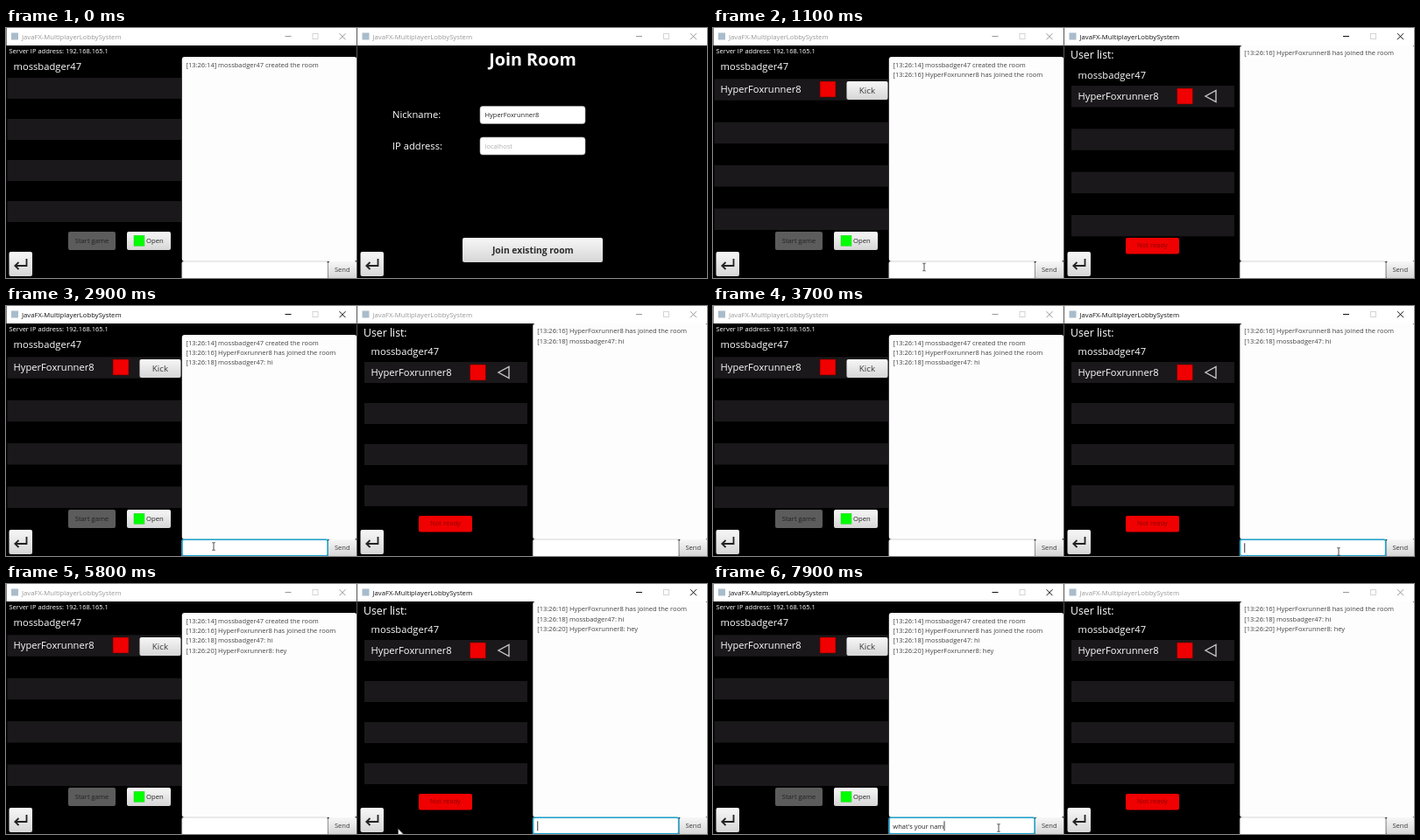
An HTML page for the animation above (8 s loop, 800 px wide and 286 px high).

```html
<!DOCTYPE html>
<html lang="en">
<head>
<meta charset="utf-8">
<title>Lobby</title>
<style>
  html, body { margin: 0; width: 100%; height: 100%; overflow: hidden; background: #000; }
  svg { display: block; width: 800px; height: 286px; }
  text { font-family: "Open Sans", "Noto Sans", sans-serif; white-space: pre; }
</style>
</head>
<body>
<svg id="stage" viewBox="0 0 800 286">
  <defs>
    <linearGradient id="btn" x2="0" y2="1">
      <stop offset="0" stop-color="#f7f7f7"/><stop offset="1" stop-color="#d6d6d6"/>
    </linearGradient>
  </defs>
</svg>
<script>
const LOOP = 8000, STEP = 100;
const HOST = 'mossbadger47', GUEST = 'HyperFoxrunner8';
const SMALL = 7.5, BIG = 11.2;
const INK = '#3c3c3c', ROW = '#1a181a';
const stage = document.getElementById('stage');

// Markup helpers
const text = (x, y, size, str, fill = '#fff', extra = '') =>
  `<text x="${x}" y="${y}" font-size="${size}" fill="${fill}" ${extra}>${str}</text>`;
const mid = (x, y, size, str, fill, extra = '') =>
  text(x, y, size, str, fill, `text-anchor="middle" ${extra}`);
const rect = (x, y, w, h, fill, extra = '') =>
  `<rect x="${x}" y="${y}" width="${w}" height="${h}" fill="${fill}" ${extra}/>`;
const group = (id, body) => `<g id="${id}">${body}</g>`;
const button = (x, y, w, h) => rect(x, y, w, h, 'url(#btn)', 'rx="2"');
const ring = (id, x, y, w, h) =>
  rect(x, y, w, h, 'none', `id="${id}" rx="2" stroke="#1fa3cc" stroke-width="1.5"`);
const rows = (x, w, ys, h) => ys.map(y => rect(x, y, w, h, ROW)).join('');

const titleBar = (id, x) =>
  rect(x, 0, 399.5, 20, '#fff') + rect(x + 5.5, 5.5, 8, 8, '#a9bccb') +
  group(id, text(x + 17.5, 12.7, 7.7, 'JavaFX-MultiplayerLobbySystem', 'currentColor') +
    `<path d="M${x + 318} 9.5h7M${x + 380} 6.2l7 7m0-7l-7 7" stroke="currentColor" fill="none"/>`) +
  rect(x + 349.5, 6.5, 6, 6, 'none', 'stroke="#d4d4d4"');

const backButton = x =>
  button(x, 256, 26.5, 28) +
  `<path d="M${x + 20} 264v8h-13m4-4l-4.2 4l4.2 4" fill="none" stroke="#222" stroke-width="1.8"/>`;

// Message area, input line and Send button
const chat = (side, x, top) =>
  rect(x, top, 199.5, 267 - top, '#fdfdfd', 'rx="3"') +
  group(side + 'Log', '') +
  rect(x, 267, 166.5, 21, '#fff', 'rx="2" stroke="#b9b9b9" stroke-width=".6"') +
  rect(x + 167, 267, 32.5, 19.5, 'url(#btn)', 'rx="2"') +
  mid(x + 183, 279.4, 7.6, 'Send', INK) +
  ring(side + 'Ring', x + .3, 267.2, 166, 18.6) +
  text(x + 4.5, 279.8, SMALL, '', '#222', `id="${side}Input"`) +
  rect(x + 5, 271.3, .9, 11, '#222', `id="${side}Caret"`);

const redBox = (x, y) => rect(x, y, 18, 18, '#f00000', 'stroke="#600" stroke-width=".6"');

const lobby = (id, top, pitch, h) => group(id,
  rows(409, 186, [0, 1, 2, 3].map(i => top + i * pitch), h) +
  text(416.5, top - 8.3, BIG, HOST) +
  text(416.5, top + 16, BIG, GUEST) +
  redBox(529.5, top + 3) +
  `<path d="M574 ${top + 5.5}v13l-12-6.5z" fill="none" stroke="#c4c4c4" stroke-width="1.4"/>`);

const field = y => rect(541, y, 120, 20, '#fff', 'rx="3" stroke="#aaa" stroke-width=".6"');

const dots = Array.from({ length: 10 }, (_, i) => {
  const a = i * Math.PI / 5;
  return `<circle cx="${5 * Math.cos(a)}" cy="${5 * Math.sin(a)}" r="1.3" fill="#fff" opacity="${.12 + i * .095}"/>`;
}).join('');

stage.insertAdjacentHTML('beforeend',
  rect(0, 0, 800, 286, '#000') +
  titleBar('leftTitle', .5) +
  text(3.5, 28.8, SMALL, 'Server IP address: 192.168.165.1') +
  group('waiting', rows(1.5, 198.5, [57, 104, 151, 198], 24)) +
  group('joined',
    rows(1.5, 198.5, [58.3, 107.7, 157, 206.5], 24.5) +
    text(8.5, 74.2, BIG, GUEST) + redBox(122, 61) +
    button(152.5, 61, 47, 21) + mid(176, 75.2, 9.8, 'Kick', INK)) +
  text(8.5, 48.3, BIG, HOST) +
  rect(71, 233, 54, 21, '#5c5c5c', 'rx="2"') + mid(98, 246.4, 7.6, 'Start game', '#222') +
  button(138, 233, 50, 21) + rect(146, 237.3, 12, 12, '#0f0', 'stroke="#3c3" stroke-width=".5"') +
  text(160, 246.4, 7.7, 'Open', '#222') +
  backButton(3.5) + chat('left', 200.8, 33) +

  rect(400, 0, 1, 286, '#555') + titleBar('rightTitle', 401) +
  group('join',
    mid(601, 43, 19.7, 'Join Room', '#fff', 'font-weight="700"') +
    text(441, 103.3, BIG, 'Nickname:') + text(441, 139, BIG, 'IP address:') +
    field(89.5) + field(125) +
    text(546.5, 102.4, SMALL, GUEST, '#222') + text(546.5, 138, SMALL, 'localhost', '#b0b0b0') +
    button(521, 240, 160, 28) + mid(601.3, 257.8, 10.3, 'Join existing room', '#2c2c2c', 'font-weight="700"') +
    group('connecting',
      ring('joinRing', 521.5, 240.5, 159.5, 27) +
      text(547.5, 171.2, 7.25, 'Connecting to server...') +
      `<g transform="translate(648 168.5)">${group('spinner', dots)}</g>`)) +
  group('room',
    text(408, 35, 12.3, 'User list:') +
    lobby('loose', 66, 49.3, 24.5) + lobby('tight', 64, 47, 24) +
    rect(471, 240, 61, 18.5, '#f00000', 'rx="2"') + mid(501.5, 251.4, 7.6, 'Not ready', '#8a0000') +
    chat('right', 601.3, 20)) +
  backButton(404.5) +

  group('cursor',
    '<path id="arrow" d="M0 0v9.2l2.1-2l1.5 3.4l1.5-.7l-1.5-3.2h2.9z" fill="#fff" stroke="#222" stroke-width=".7"/>' +
    '<path id="beam" d="M-1.7-4.3h1.3l.4.4l.4-.4h1.3M0-4v8M-1.7 4.3h1.3l.4-.4l.4.4h1.3" fill="none" stroke="#222" stroke-width=".8"/>'));

const $ = Object.fromEntries([...stage.querySelectorAll('[id]')].map(el => [el.id, el]));
const show = (el, on) => el.setAttribute('visibility', on ? 'inherit' : 'hidden');

// Timelines: [ms, value]
const focus = [[0, ''], [900, 'right'], [1400, 'left'], [3600, 'right'], [5900, 'left']];
const typing = {
  left: [[0, ''], [1900, 'h'], [2200, 'hi'], [2400, ''], [6500, 'w'], [6600, 'wha'], [6700, 'what'], [6800, "what'"]],
  right: [[0, ''], [4000, 'h'], [4200, 'he'], [4300, 'hey'], [4500, '']]
};
[...'s your nam'].forEach((c, i) =>
  typing.left.push([7000 + i * STEP, "what'" + 's your nam'.slice(0, i + 1)]));
const messages = [
  [0, `[13:26:14] ${HOST} created the room`],
  [1100, `[13:26:16] ${GUEST} has joined the room`],
  [2400, `[13:26:18] ${HOST}: hi`],
  [4500, `[13:26:20] ${GUEST}: hey`]
];
const path = [
  [100, 436, 290], [800, 524, 254], [1000, 521.7, 252.5], [1100, 241, 273.5], [1500, 238, 275],
  [2900, 237, 275], [3700, 714, 281], [3800, 716, 281], [5300, 716, 281], [6100, 323, 279], [6300, 326, 279]
];

const at = (table, t) => table.filter(k => k[0] <= t).pop()[1];

function pointer(t) {
  const i = path.findIndex(k => k[0] > t);
  if (i < 1) return path[i ? path.length - 1 : 0].slice(1);
  const [t0, x0, y0] = path[i - 1], [t1, x1, y1] = path[i];
  const p = (t - t0) / (t1 - t0), e = p * p * (3 - 2 * p);
  return [x0 + (x1 - x0) * e, y0 + (y1 - y0) * e];
}

function drawSide(side, t, first, baseline) {
  const x = side === 'left' ? 205.5 : 606.3;
  const active = at(focus, t) === side, focused = active && t >= 1400;
  const typed = at(typing[side], t);
  $[side + 'Title'].style.color = active ? '#111' : '#989898';
  show($[side + 'Ring'], focused);
  $[side + 'Input'].textContent = typed;
  show($[side + 'Caret'], focused && (typed || side === 'right'));
  $[side + 'Caret'].setAttribute('x', x + $[side + 'Input'].getComputedTextLength());
  $[side + 'Log'].innerHTML = messages.slice(first).filter(m => m[0] <= t)
    .map((m, i) => text(x, baseline + i * 11.3, SMALL, m[1], '#444')).join('');
}

function draw(t) {
  const inRoom = t >= 1100;
  show($.waiting, !inRoom);
  show($.joined, inRoom);
  show($.join, !inRoom);
  show($.room, inRoom);
  show($.connecting, !inRoom && t >= 900);
  show($.loose, inRoom && t < 1200);
  show($.tight, t >= 1200);
  $.spinner.setAttribute('transform', `rotate(${(t - 1000) * .36 - 160})`);
  drawSide('left', t, 0, 44.8);
  drawSide('right', t, 1, 31.2);
  // Right-hand parts stay hidden until the room opens
  if (!inRoom) ['rightRing', 'rightCaret'].forEach(id => show($[id], false));

  const [x, y] = pointer(t);
  const overInput = y > 267 && (x > 201 && x < 367 || inRoom && x > 601 && x < 768);
  $.cursor.setAttribute('transform', `translate(${x} ${y})`);
  show($.arrow, !overInput);
  show($.beam, overInput);
}

let last = -1;
function tick() {
  const t = Math.floor(performance.now() % LOOP / STEP) * STEP;
  if (t !== last) draw(last = t);
  requestAnimationFrame(tick);
}
tick();
</script>
</body>
</html>
```
